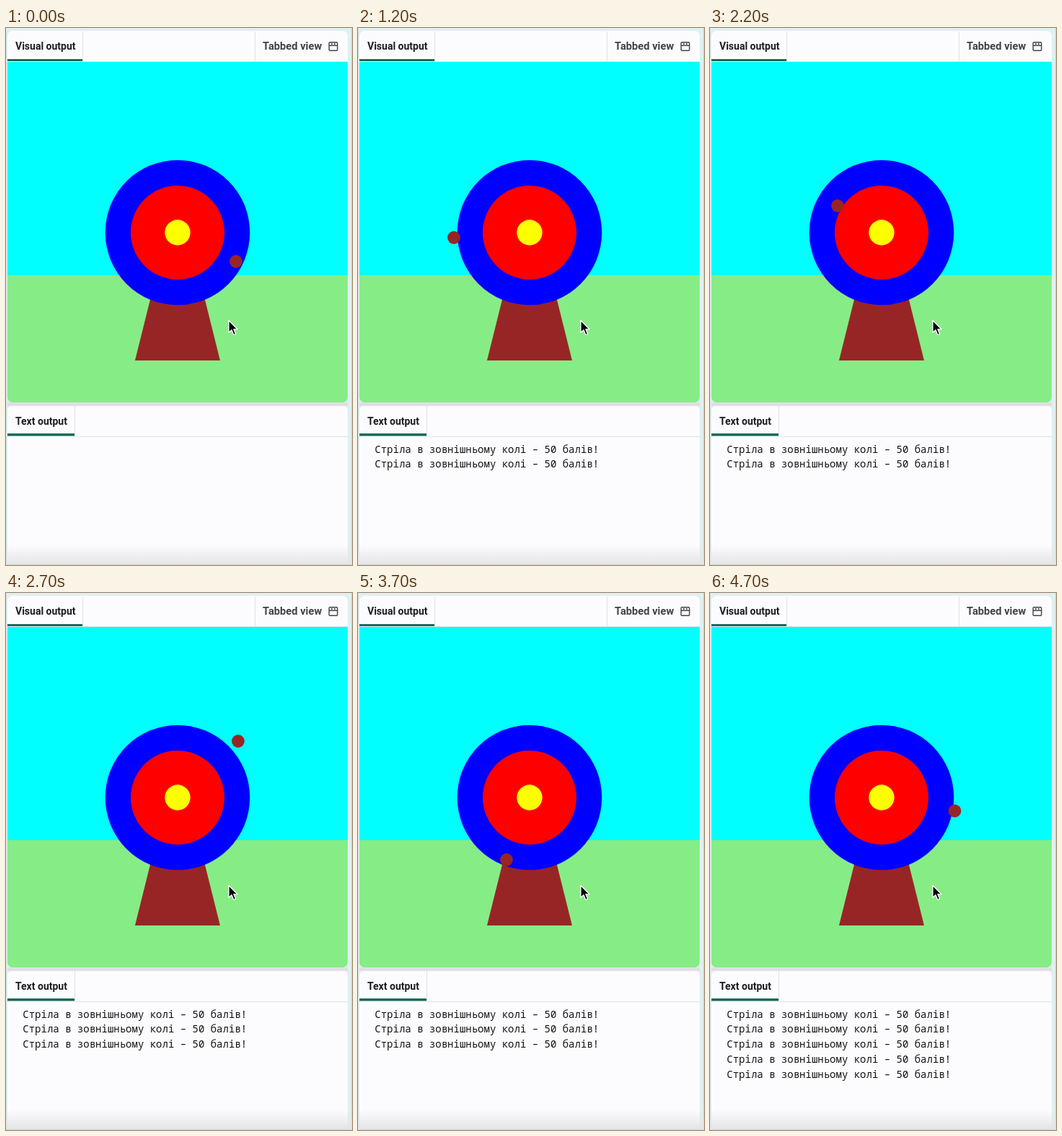
Recreate the animation shown at these times as an HTML page. Size 480x743 px, loop 4800 ms.

```html
<!DOCTYPE html>
<html lang="en">
<head>
<meta charset="utf-8">
<title>Target practice</title>
<style>
  html, body { margin: 0; width: 100%; height: 100%; overflow: hidden; background: #e0f0f0; }
  svg { display: block; }
  .tab { font: bold 14px Roboto, Arial, sans-serif; fill: #1c1c22; }
  #log { font: 14px "Noto Sans Mono", "DejaVu Sans Mono", monospace; fill: #111; }
</style>
</head>
<body>
<svg width="480" height="743" viewBox="0 0 480 743">
  <defs>
    <linearGradient id="fade" x2="0" y2="1">
      <stop offset="0" stop-color="#e4e4e6" stop-opacity="0"/>
      <stop offset="1" stop-color="#e4e4e6"/>
    </linearGradient>
  </defs>
  <rect width="480" height="743" fill="#e0f0f0"/>
  <path d="M0 0V743M479.5 0V743" stroke="#c9d8d8"/>

  <!-- Visual output panel -->
  <rect x="2" y="4" width="472" height="60" rx="7" fill="#fcfcfe"/>
  <path d="M106.5 5V46M345.5 5V46M106 46.5H474" stroke="#dfe1e5"/>
  <rect x="2" y="43" width="104" height="3" fill="#136b5c"/>
  <text class="tab" x="13" y="30">Visual output</text>
  <text class="tab" x="356" y="30" style="font-size:14.7px;fill:#424248">Tabbed view</text>
  <g fill="none" stroke="#424248" stroke-width="1.4">
    <rect x="448.2" y="19.7" width="11.6" height="11.6" rx="1.2"/>
    <path d="M448 24.2H460M451 22H453M455 22H457"/>
  </g>
  <rect x="2" y="518" width="472" height="5" fill="#e0dfe5"/>
  <path d="M2 47H474V342H2Z" fill="#0ff"/>
  <path d="M2 342H474V511A7 7 0 0 1 467 518H9A7 7 0 0 1 2 511Z" fill="#86ec86"/>
  <path d="M179 460L238 224L297 460Z" fill="#982525"/>
  <g id="rings"></g>
  <circle id="arrow" r="8.9" fill="#982525"/>
  <path d="M309 404.5V421.5L313 417.8L315.8 424.5L318.7 423.2L315.9 416.8H321Z"
        fill="#000" stroke="#fff" stroke-width="1.3" stroke-linejoin="round"/>

  <!-- Text output panel -->
  <rect x="2" y="523" width="472" height="219" rx="6" fill="#fcfcfe"/>
  <path d="M95.5 523V564M95 565.5H474" stroke="#dfe1e5"/>
  <rect x="2" y="561" width="93" height="3.5" fill="#136b5c"/>
  <text class="tab" x="13" y="549">Text output</text>
  <g id="log"></g>
  <rect y="715" width="480" height="28" fill="url(#fade)"/>
  <path d="M0 742.5H480" stroke="#d0d5d6"/>
</svg>
<script>
const LOOP = 4800;
// Each shot: start time, x, y
const shots = [
  [0, 319, 323], [200, 306.5, 252], [700, 290, 340], [1200, 133, 290],
  [1700, 268, 211], [2200, 177, 246], [2700, 322, 205], [3200, 225, 180],
  [3700, 206, 369], [4200, 184, 317], [4700, 339.5, 301.5]
];
const hitTimes = [400, 900, 2400, 3800, 4000];
const message = 'Стріла в зовнішньому колі – 50 балів!';

const arrow = document.getElementById('arrow');
const log = document.getElementById('log');

function add(parent, name, attrs, text = '') {
  const el = document.createElementNS('http://www.w3.org/2000/svg', name);
  for (const key in attrs) el.setAttribute(key, attrs[key]);
  el.textContent = text;
  return parent.appendChild(el);
}

for (const [r, fill] of [[100.3, '#00f'], [65, '#f00'], [17.7, '#ff0']])
  add(document.getElementById('rings'), 'circle', { cx: 238, cy: 283, r, fill });

const lines = hitTimes.map((_, i) =>
  add(log, 'text', { x: 23.3, y: 587.5 + 20.8 * i }, message));

function draw(now) {
  const t = now % LOOP;
  const [, x, y] = shots.findLast(shot => shot[0] <= t);
  arrow.setAttribute('cx', x);
  arrow.setAttribute('cy', y);
  lines.forEach((line, i) =>
    line.setAttribute('visibility', t >= hitTimes[i] ? 'visible' : 'hidden'));
}

const start = performance.now();
function tick() {
  draw(performance.now() - start);
  requestAnimationFrame(tick);
}
tick();
</script>
</body>
</html>
```
